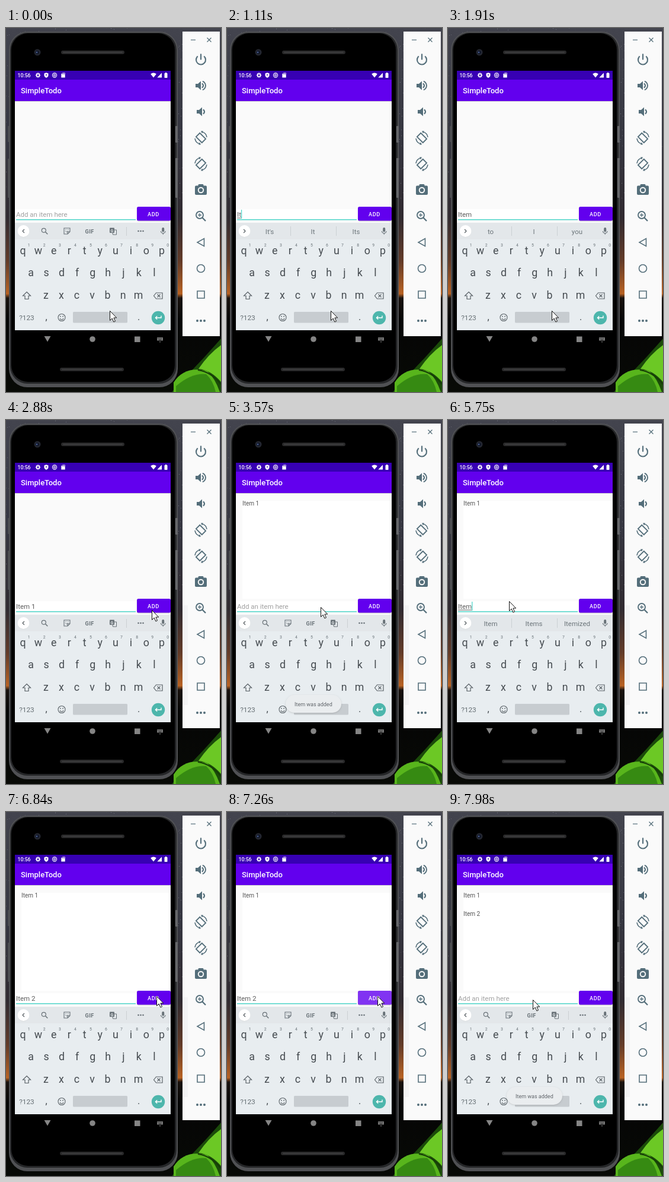
Write an HTML page with a canvas that moves like this. It is 363 by 613 pixels and loops after 8 s.

```html
<!DOCTYPE html>
<html lang="en">
<head>
<meta charset="utf-8">
<title>Todo app demo</title>
<style>
html, body { margin: 0; width: 100%; height: 100%; overflow: hidden; background: #000; }
canvas { display: block; width: 363px; height: 613px; }
</style>
</head>
<body>
<canvas id="stage" width="363" height="613"></canvas>
<script>
const c = document.getElementById('stage').getContext('2d');
const LOOP = 8000;
const SLATE = '#546e7a', KEY = '#454b50', TOOL = '#687177';

const IDLE = null;
const AFTER_I = ["I'm", 'I', "I'll"];
const AFTER_IT = ["It's", 'It', 'Its'];
const AFTER_ITE = ['Item', 'Ite', 'Items'];
const AFTER_ITEM = ['Item', 'Items', 'Itemized'];
const NEXT_WORD = ['to', 'I', 'you'];

// Each step changes part of the state and holds until the next one.
const steps = [
  [0, { text: '', words: IDLE, caret: 0, items: 0, toast: 0, press: 0, mouse: [175, 476], seam: 0, composing: 0 }],
  [410, { caret: 1 }],
  [960, { text: 'I', words: AFTER_I, composing: 1 }],
  [1100, { text: 'It', words: AFTER_IT }],
  [1240, { text: 'Ite', words: AFTER_ITE }],
  [1380, { text: 'Item', words: AFTER_ITEM }],
  [1910, { text: 'Item ', words: NEXT_WORD, caret: 0, composing: 0 }],
  [2070, { text: 'Item 1', words: IDLE, caret: 1 }],
  [2180, { mouse: [180, 468] }],
  [2320, { mouse: [199, 428], seam: 1 }],
  [2460, { mouse: [222, 375] }],
  [2600, { mouse: [238, 337], caret: 0 }],
  [2740, { mouse: [245, 323] }],
  [2880, { mouse: [246, 320] }],
  [3030, { press: 1 }],
  [3170, { press: 0.6, text: '', items: 1 }],
  [3300, { press: 0, mouse: [228, 319], toast: 0.35 }],
  [3440, { mouse: [190, 317], toast: 0.8 }],
  [3570, { mouse: [158, 315], toast: 1 }],
  [3720, { mouse: [132, 315] }],
  [3870, { mouse: [120, 315] }],
  [4140, { mouse: [111, 315], caret: 1 }],
  [4420, { mouse: [108, 312] }],
  [4560, { mouse: [105, 308] }],
  [4700, { mouse: [103, 305], caret: 0 }],
  [5120, { toast: 0.5, caret: 1 }],
  [5330, { text: 'I', words: AFTER_I, composing: 1, toast: 0 }],
  [5470, { text: 'It', words: AFTER_IT }],
  [5610, { text: 'Ite', words: AFTER_ITE }],
  [5750, { text: 'Item', words: AFTER_ITEM }],
  [5870, { text: 'Item ', words: NEXT_WORD, composing: 0 }],
  [6130, { text: 'Item 2', words: IDLE }],
  [6410, { mouse: [130, 309] }],
  [6550, { mouse: [188, 313] }],
  [6690, { mouse: [238, 312], caret: 0 }],
  [6840, { mouse: [254, 310] }],
  [7140, { press: 1 }],
  [7280, { press: 0.6, text: '', items: 2 }],
  [7420, { press: 0, mouse: [239, 311], toast: 0.35 }],
  [7560, { mouse: [207, 313], toast: 0.8 }],
  [7700, { mouse: [171, 315], toast: 1 }],
  [7840, { mouse: [150, 316] }],
  [7980, { mouse: [143, 316] }]
];

function stateAt(t) {
  return Object.assign({}, ...steps.filter(([start]) => start <= t).map(([, change]) => change));
}

function rect(x, y, w, h, fill, r = 0) {
  c.fillStyle = fill;
  c.beginPath();
  c.roundRect(x, y, w, h, r);
  c.fill();
}
function disc(x, y, r, fill) {
  c.fillStyle = fill;
  c.beginPath();
  c.arc(x, y, r, 0, 7);
  c.fill();
}
function ring(x, y, r, color, width = 1.2, from = 0, to = 7) {
  c.strokeStyle = color;
  c.lineWidth = width;
  c.beginPath();
  c.arc(x, y, r, from, to);
  c.stroke();
}
function label(s, x, y, size, color, align = 'left', weight = 400, spacing = 0) {
  c.font = `${weight} ${size}px Roboto, sans-serif`;
  c.letterSpacing = spacing + 'px';
  c.textAlign = align;
  c.fillStyle = color;
  c.fillText(s, x, y);
  c.letterSpacing = '0px';
}
// Icons are paths placed by their centre.
function icon(x, y, d, { fill, stroke, width = 1.4, turn = 0 }) {
  c.save();
  c.translate(x, y);
  c.rotate(turn);
  const path = new Path2D(d);
  if (fill) { c.fillStyle = fill; c.fill(path); }
  if (stroke) { c.strokeStyle = stroke; c.lineWidth = width; c.stroke(path); }
  c.restore();
}
function dots(x, y, gap, r, color) {
  for (let i = -1; i <= 1; i++) disc(x + i * gap, y, r, color);
}
function gradient(y0, y1, ...stops) {
  const g = c.createLinearGradient(0, y0, 0, y1);
  stops.forEach(([at, color]) => g.addColorStop(at, color));
  return g;
}

function drawBackdrop() {
  rect(0, 0, 363, 613, gradient(0, 613, [0, '#43444e'], [0.3, '#353640'], [0.52, '#302a30'],
    [0.64, '#633b28'], [0.73, '#b86223'], [0.742, '#18110d'], [0.8, '#050505'], [1, '#080a06']));
  let seed = 7;
  const random = () => (seed = seed * 16807 % 2147483647) / 2147483647;
  for (let i = 0; i < 800; i++) {
    const x = random() * 363, y = random() * 290, a = random() * 0.38;
    rect(x | 0, y | 0, 1, 1, `rgba(205,205,222,${a})`);
  }
  icon(0, 0, 'M280 613C300 590 331 560 363 523V613Z', { fill: '#1b4b0a' });
  icon(0, 0, 'M283 597C295 577 317 571 340 578Q353 590 361 613H283Z', { fill: '#58b51c' });
  icon(0, 0, 'M325 574Q342 549 363 534V596Q346 576 325 574Z', { fill: '#6cc825' });
  icon(0, 0, 'M287 603Q314 580 338 583Q350 594 354 613H287Z', { fill: '#368a12' });
  icon(0, 0, 'M324 576Q346 579 363 600', { stroke: '#153b07', width: 2 });
}

function drawPhone() {
  rect(3, 165, 4, 27, '#4c4d50', 1);
  rect(3, 220, 4, 66, '#4c4d50', 1);
  rect(5, 6, 285, 599, '#505154', 31);
  rect(7, 8, 281, 591, '#252628', 29);
  rect(9, 9, 276, 587, '#000', 28);
  rect(286, 165, 4, 28, '#66676a', 1);
  rect(286, 219, 4, 67, '#66676a', 1);
  rect(93, 38, 107, 6, '#29292a', 3);
  rect(96, 40, 101, 2, '#3b3b3c', 1);
  rect(91, 572, 108, 6, '#29292a', 3);
  rect(94, 574, 102, 2, '#3b3b3c', 1);
  disc(53, 41, 5.5, '#242730');
  disc(53, 41, 3, '#101729');
  disc(52, 41, 1.3, '#4b5f92');
  rect(15, 72, 263, 437, '#fafafa');
}

function drawBars() {
  rect(15, 72, 263, 15, '#3700b3');
  rect(15, 87, 263, 36, '#6200ee');
  rect(15, 123, 263, 1, '#c9c5d0');
  label('10:56', 19.5, 82.5, 8.7, '#fff', 'left', 500);
  label('SimpleTodo', 25, 110, 13, '#fff', 'left', 500);
  ring(54, 79.5, 2.4, '#fff', 1.7);
  for (let i = 0; i < 8; i++) {
    const a = i * Math.PI / 4;
    disc(54 + 3.7 * Math.cos(a), 79.5 + 3.7 * Math.sin(a), 0.75, '#fff');
  }
  icon(68, 79.5, 'M0-4.3L3.5-3V0Q3.5 3 0 4.4Q-3.5 3-3.5 0V-3Z', { fill: '#fff' });
  disc(68, 79, 1.1, '#3700b3');
  ring(82, 79.5, 3.6, '#fff', 1.1);
  ring(82, 79.5, 1.5, '#fff', 1.1);
  icon(96.5, 79.5, 'M-1-4H3.2V4H-3.2V-1.8Z', { fill: '#fff' });
  for (let x = 95; x < 99; x += 1.6) rect(x, 76.3, 0.8, 1.8, '#3700b3');
  icon(249, 79.5, 'M-4.8-2Q0-6 4.8-2L0 4Z', { fill: '#fff' });
  icon(259.5, 79.5, 'M3.5-4V4H-4.2Z', { fill: '#fff' });
  rect(267.5, 76, 5, 8, '#fff', 0.7);
  rect(269, 75, 2, 1, '#fff');
}

function drawNavigation() {
  const gray = '#858585';
  icon(70, 523.5, 'M-5.5-4.5H5.5L0 5Z', { fill: gray });
  disc(146, 524, 4.8, gray);
  rect(217, 519.5, 9.5, 9.5, gray);
  rect(255, 521, 10, 5.5, '#777', 0.5);
  for (let x = 256; x < 264; x += 2) rect(x, 522.2, 1, 1, '#111');
  rect(257.5, 524.6, 5, 0.8, '#111');
  icon(260, 529, 'M-1.5-1H1.5L0 0.8Z', { fill: '#777' });
}

function drawSuggestions(words) {
  rect(15, 328, 263, 28, '#e3e7ea');
  disc(29.5, 342.5, 10, '#d2d6d9');
  disc(29.5, 342, 10, '#fff');
  icon(29.5, 342, words ? 'M-1.5-3L1.5 0L-1.5 3' : 'M1.5-3L-1.5 0L1.5 3', { stroke: '#555c60', width: 1.2 });
  rect(263.2, 336, 4, 7.5, TOOL, 2);
  icon(265.2, 342, 'M-3.8 0Q-3.5 3.6 0 3.6Q3.5 3.6 3.8 0M0 3.6V6', { stroke: TOOL, width: 1.1 });
  if (words) {
    words.forEach((word, i) => label(word, 72 + 73 * i, 346.5, 11.5, '#6c757a', 'center'));
    rect(107, 334, 1, 16, '#cbd0d3');
    rect(184, 334, 1, 16, '#cbd0d3');
    return;
  }
  ring(63.8, 340.8, 3.5, TOOL);
  icon(65, 342, 'M1.5 1.5L5.3 5.3', { stroke: TOOL, width: 1.5 });
  icon(103, 342, 'M-5-5H5V1L1 5H-5ZM5 1H1V5', { stroke: TOOL, width: 1.1 });
  icon(103, 342, 'M-2.6 0Q-.5 3 2 0M-2.5-2.5H-1.3M1.3-2.5H2.5', { stroke: TOOL, width: 0.9 });
  label('GIF', 141.2, 345.5, 9.2, TOOL, 'center', 700, 0.4);
  rect(175, 336.5, 8, 8.5, TOOL, 1);
  icon(182.5, 343.5, 'M-3.5-3.5H4V4.5H-2Z', { stroke: TOOL, width: 1 });
  label('G', 178.9, 343.5, 7, '#e3e7ea', 'center', 700);
  rect(203, 335, 1, 15, '#cbd0d3');
  dots(227.5, 342, 4, 1.3, TOOL);
}

function keyRow(keys, x, y) {
  [...keys].forEach((key, i) => label(key, x + 26.05 * i, y, 17.8, KEY, 'center'));
}

function drawKeyboard(state) {
  rect(15, 328, 263, 181, '#e8edf0');
  drawSuggestions(state.words);
  keyRow('qwertyuiop', 28.5, 381);
  keyRow('asdfghjkl', 42, 418);
  keyRow('zxcvbnm', 67.3, 456.2);
  [...'1234567890'].forEach((n, i) => label(n, 38.7 + 26.05 * i, 368, 6.8, '#697278', 'center'));
  icon(35, 451, 'M0-6.5L6.5 0H3V5.5H-3V0H-6.5Z', { stroke: '#596166', width: 1.2 });
  icon(257, 451, 'M-7.5 0L-3.5-5H7V5H-3.5ZM-1.5-2.5L3.5 2.5M3.5-2.5L-1.5 2.5', { stroke: '#596166', width: 1.2 });
  label('?123', 35, 491.5, 11.8, '#646d72', 'center');
  label(',', 68, 492, 16, KEY, 'center');
  ring(94, 487.5, 6, '#596166', 1.1);
  ring(94, 488.2, 3, '#596166', 1.1, 0.2, 2.94);
  disc(91.9, 485.7, 0.9, '#596166');
  disc(96.1, 485.7, 0.9, '#596166');
  rect(113, 478, 92, 18.5, '#c7ccd0', 1.5);
  label('.', 224, 492, 16, KEY, 'center');
  disc(257, 488, 11.2, '#4db6ac');
  icon(257, 488, 'M5-3.5V0H-4.5M-1.8-2.8L-4.6 0L-1.8 2.8', { stroke: '#fff', width: 1.4 });
}

function drawForm(state) {
  if (state.items) rect(26, 136, 252, 165, '#fff');
  for (let i = 0; i < state.items; i++) label('Item ' + (i + 1), 26, 144 + 30.5 * i, 10, '#555');
  rect(17, 305, 202, 17, '#fff');
  rect(17, 322, 202, 1.4, '#50d5ca');
  if (state.text) label(state.text, 17, 318, 11.5, '#5b5b5b');
  else label('Add an item here', 17, 318, 11.5, '#a0a0a0');
  const width = state.text ? c.measureText(state.text).width : 0;
  if (state.composing) rect(17, 319.5, width, 1, '#5b5b5b');
  if (state.caret) rect(17 + width, 306, 1.3, 15, '#50d5ca');
  rect(221, 302, 57, 23.5, '#c7c7ca', 2.5);
  rect(221, 301, 57, 23.5, '#6200ee', 2.5);
  if (state.press) rect(221, 301, 57, 23.5, `rgba(255,255,255,${0.2 * state.press})`, 2.5);
  label('ADD', 239, 316.5, 9.2, '#fff', 'left', 500, 0.6);
}

function drawToast(alpha) {
  if (!alpha) return;
  c.save();
  c.globalAlpha = alpha;
  c.shadowColor = 'rgba(0,0,0,.14)';
  c.shadowBlur = 3;
  c.shadowOffsetY = 1;
  rect(99, 463, 94, 30, '#eaedef', 15);
  c.shadowColor = 'transparent';
  label('Item was added', 114, 481.5, 9, '#60656a');
  c.restore();
}

function drawSpeaker(x, y, loud) {
  icon(x, y, 'M-8-3H-4L1-7.5V7.5L-4 3H-8Z', { fill: SLATE });
  ring(x + 1, y, 4, SLATE, 2.2, -1.1, 1.1);
  if (loud) ring(x + 1, y, 8, SLATE, 1.9, -1.2, 1.2);
}

function drawRotate(y, side) {
  c.save();
  c.translate(329, y);
  c.scale(side, 1);
  icon(0, 0, 'M-4.5-7H4.5V7H-4.5Z', { stroke: SLATE, width: 1.8, turn: -Math.PI / 4 });
  icon(0, 0, 'M1-10Q9-9 10-1M-1 10Q-9 9-10 1', { stroke: SLATE, width: 1.6 });
  icon(0, 0, 'M0-11.5H4L2-7.5ZM0 11.5H-4L-2 7.5Z', { fill: SLATE });
  c.restore();
}

function drawToolbar(seam) {
  rect(298, 6, 63, 513, '#fafafa');
  if (seam) rect(298, 312, 9, 168, '#f3f3f4');
  rect(312, 19.5, 8, 1.2, SLATE);
  icon(343, 20, 'M-3.5-3.5L3.5 3.5M3.5-3.5L-3.5 3.5', { stroke: SLATE, width: 1.3 });
  ring(329, 53.5, 8, SLATE, 2.1, -0.85, Math.PI + 0.85);
  rect(328, 43.5, 2.1, 10, SLATE);
  drawSpeaker(328, 97, true);
  drawSpeaker(330, 141, false);
  drawRotate(185, 1);
  drawRotate(229, -1);
  rect(319, 265.5, 20, 15.5, SLATE, 2);
  rect(324.5, 263, 9, 5, SLATE, 1.5);
  disc(329, 273, 5.2, '#fafafa');
  disc(329, 273, 3.3, SLATE);
  ring(327, 315, 6, SLATE, 1.9);
  icon(327, 315, 'M4.5 4.5L10 10', { stroke: SLATE, width: 2.3 });
  icon(327, 315, 'M-3 0H3M0-3V3', { stroke: SLATE, width: 1.3 });
  icon(329, 361, 'M5.5-6.5V6.5L-6 0Z', { stroke: SLATE, width: 1.6 });
  ring(329, 405, 6.5, SLATE, 1.6);
  icon(329, 449, 'M-6-6H6V6H-6Z', { stroke: SLATE, width: 1.6 });
  dots(329, 493, 6, 2, SLATE);
}

function drawMouse([x, y]) {
  icon(x + 0.5, y + 0.5, 'M0 0V16L3.7 12.5L6.4 18.5L9 17.3L6.4 11.5H11.2Z', { fill: '#fff', stroke: '#111', width: 1 });
}

function draw(t) {
  const state = stateAt(t);
  drawBackdrop();
  drawPhone();
  drawBars();
  drawForm(state);
  drawKeyboard(state);
  drawToast(state.toast);
  drawNavigation();
  drawToolbar(state.seam);
  drawMouse(state.mouse);
}

let begin;
function tick(now) {
  begin ??= now;
  draw((now - begin) % LOOP);
  requestAnimationFrame(tick);
}
draw(0);
requestAnimationFrame(tick);
</script>
</body>
</html>
```
